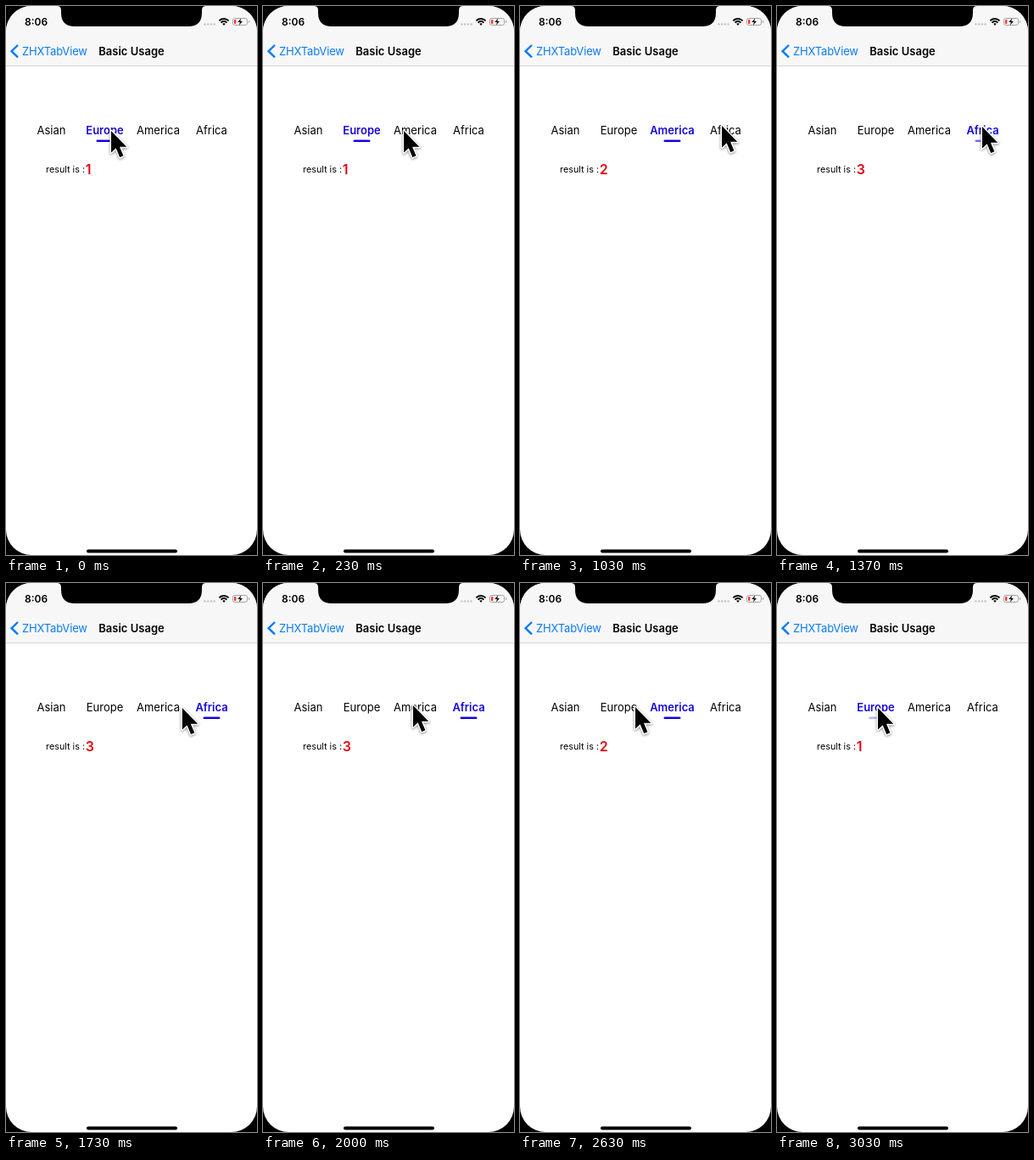
Recreate the animation shown at these times as an HTML page. Size 296x646 px, loop 3.06 s.

```html
<!DOCTYPE html>
<html lang="en">
<head>
<meta charset="utf-8">
<title>Tab view</title>
<style>
  html, body { margin: 0; width: 100%; height: 100%; overflow: hidden; background: #000; }
  svg { display: block; width: 296px; height: 646px; }
  text { font: 13px Inter, sans-serif; fill: #000; }
  .bold { font-weight: 600; }
  .tabs { text-anchor: middle; }
  .tabs .on { font-weight: 600; fill: #1608d8; }
  #cursor { filter: drop-shadow(0 1.5px 1.5px #0007); }
</style>
</head>
<body>
<svg viewBox="0 0 296 646">
  <clipPath id="screen"><rect width="296" height="646" rx="30"/></clipPath>
  <g clip-path="url(#screen)">
    <rect width="296" height="646" fill="#fff"/>
    <rect width="296" height="70" fill="#f7f7f7"/>
    <rect y="70" width="296" height="1" fill="#d4d4d4"/>
  </g>
  <path d="M60 0Q65 0 65 5V8Q65 24 81 24H215Q231 24 231 8V5Q231 0 236 0Z"/>

  <text class="bold" x="22" y="23" style="font-size:12px">8:06</text>
  <g fill="#c4c4c4">
    <circle cx="234.5" cy="21.5" r="1.2"/><circle cx="238.2" cy="21.5" r="1.2"/>
    <circle cx="241.9" cy="21.5" r="1.2"/><circle cx="245.6" cy="21.5" r="1.2"/>
  </g>
  <g fill="none" stroke="#000" stroke-width="1.9">
    <path d="M251.4 17.4Q257 12.4 262.6 17.4M253.5 19.6Q257 16.6 260.5 19.6"/>
    <path d="M255.2 20.8Q257 19.5 258.8 20.8L257 22.9Z" fill="#000" stroke="none"/>
  </g>
  <rect x="267.5" y="14.5" width="17" height="8" rx="2.2" fill="none" stroke="#a2a2a2"/>
  <path d="M286 17v3q1.3-.4 1.3-1.5t-1.3-1.5" fill="#a2a2a2"/>
  <rect x="269" y="16" width="2.4" height="5" rx=".7" fill="#f03a30"/>
  <path d="M277.3 14.6L273.2 19H275.9L274.9 22.6L279 18H276.3Z"/>

  <path d="M14 46L6.5 53.2L14 60.4" fill="none" stroke="#007aff" stroke-width="2.4"/>
  <text x="19" y="57.5" style="fill:#0a7bf0;letter-spacing:-.15px">ZHXTabView</text>
  <text class="bold" x="148" y="57.5" text-anchor="middle">Basic Usage</text>

  <g class="tabs">
    <text x="53.5" y="150.7">Asian</text>
    <text x="116.5" y="150.7">Europe</text>
    <text x="179.5" y="150.7">America</text>
    <text x="242.5" y="150.7">Africa</text>
  </g>
  <rect id="bar" y="157.4" height="2.6" rx="1.3" fill="#1400ec"/>
  <text x="47" y="196" style="font-size:10.8px">result is :</text>
  <text id="result" class="bold" x="93.7" y="197.8" style="font-size:16px;fill:#e00814"></text>

  <rect x="95" y="639.5" width="107" height="4" rx="2"/>
  <path id="cursor" d="M0 0V25.5L5.7 20.2L10.2 31L14.4 29.2L10 18.7H18.3Z"
    stroke="#fff" stroke-width="3" stroke-linejoin="round" paint-order="stroke"/>
</svg>
<script>
const LOOP = 3060, FADE = 230;
// time, x, y of the pointer tip
const path = [
  [0, 124, 147], [230, 166, 147], [360, 180, 149], [740, 180, 149],
  [1030, 238, 141], [1130, 242, 142], [1560, 242, 142], [1730, 208, 147],
  [1960, 177, 144], [2400, 177, 144], [2760, 119, 147], [3030, 119, 147],
  [3060, 124, 147]
];
// time, selected tab
const clicks = [[-FADE, 1], [460, 2], [1240, 3], [2260, 2], [2960, 1]];
const tabs = document.querySelectorAll('.tabs text');
const [bar, result, cursor] = ['bar', 'result', 'cursor'].map(id => document.getElementById(id));

// Monotone cubic: harmonic mean of neighbouring slopes, zero at turning points
function slope(i, k) {
  const rate = j => (path[j + 1][k] - path[j][k]) / (path[j + 1][0] - path[j][0]);
  if (i === 0 || i === path.length - 1) return 0;
  const a = rate(i - 1), b = rate(i);
  return a * b > 0 ? 2 * a * b / (a + b) : 0;
}

function position(t, k) {
  const i = path.findLastIndex(p => p[0] <= t);
  const p = path[i], q = path[i + 1], d = q[0] - p[0], u = (t - p[0]) / d;
  return p[k] * (1 + 2 * u) * (1 - u) ** 2 + q[k] * u * u * (3 - 2 * u)
    + d * u * (1 - u) * (slope(i, k) * (1 - u) - slope(i + 1, k) * u);
}

function draw(now) {
  const t = now % LOOP;
  const [since, tab] = clicks.findLast(c => c[0] <= t);
  const grow = Math.min(1, (t - since) / FADE);
  const width = 20 * (0.75 + 0.25 * grow);

  tabs.forEach((label, i) => label.classList.toggle('on', i === tab));
  result.textContent = tab;
  bar.setAttribute('x', 53.5 + 63 * tab - width / 2);
  bar.setAttribute('width', width);
  bar.setAttribute('opacity', grow);
  cursor.setAttribute('transform', `translate(${position(t, 1)} ${position(t, 2)})`);
  requestAnimationFrame(draw);
}
const start = performance.now();
const tick = draw;
draw = () => tick(Math.max(0, performance.now() - start));
draw();
</script>
</body>
</html>
```
